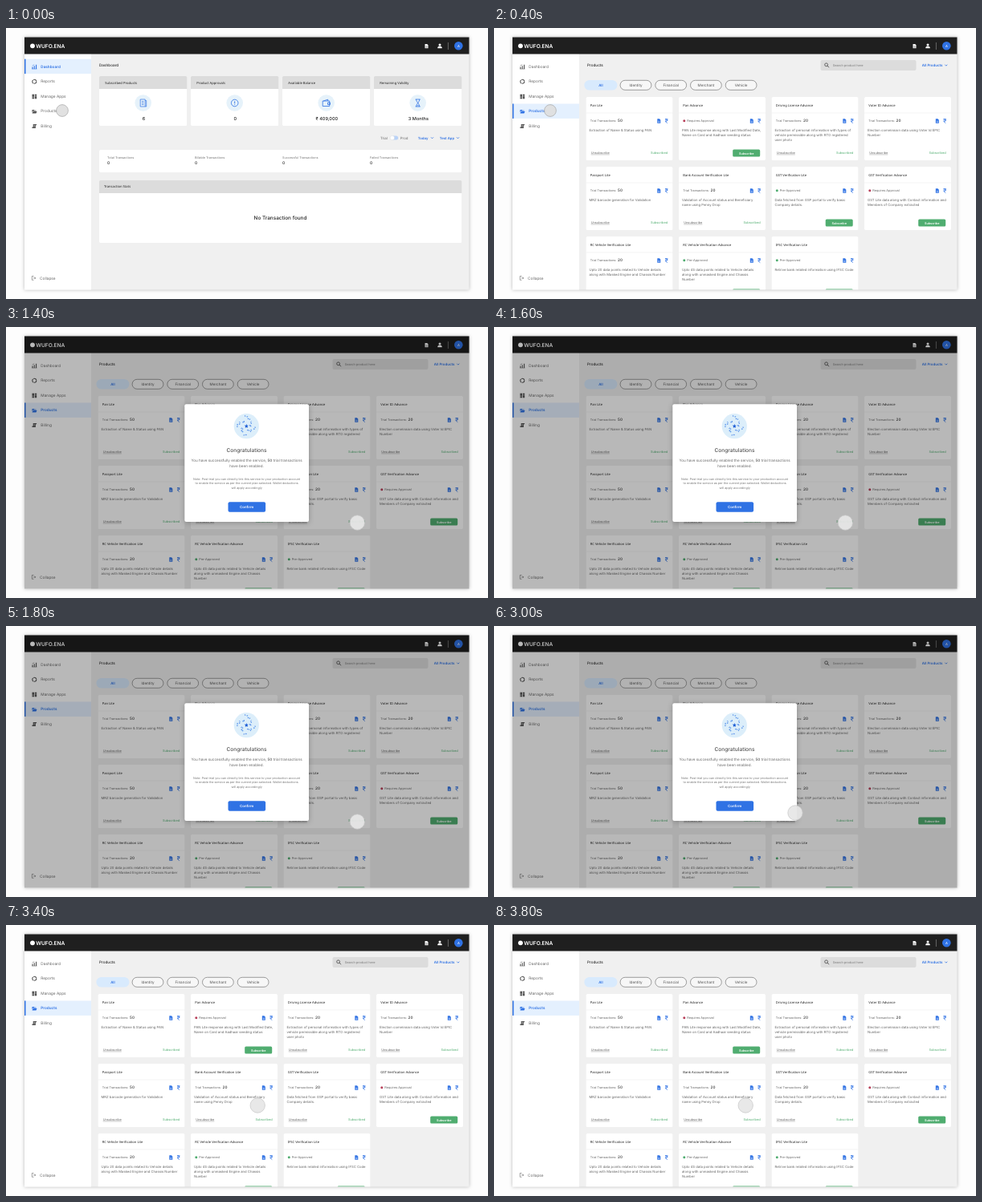
An HTML page that plays this animation: 600x338 px, repeating every 4 s.

```html
<!DOCTYPE html>
<html lang="en">
<head>
<meta charset="utf-8">
<title>Product subscription</title>
<style>
html, body { margin: 0; width: 100%; height: 100%; overflow: hidden; background: #fdfdfd; }
svg { display: block; width: 100vw; height: 100vh; }
text { font-family: Inter, Roboto, sans-serif; text-rendering: geometricPrecision; white-space: pre; }
.noto { font-family: "Noto Sans", "Open Sans", sans-serif; }
.window { filter: drop-shadow(0 0.5px 2px rgba(0, 0, 0, .28)); }
.card { filter: drop-shadow(0 0.3px 0.6px rgba(0, 0, 0, .07)); }
.dialog { filter: drop-shadow(0 1px 3px rgba(0, 0, 0, .25)); }
</style>
</head>
<body>
<svg id="stage" viewBox="0 0 600 338" xmlns="http://www.w3.org/2000/svg"></svg>
<script>
const BLUE = '#2f72e4', GREEN = '#50ad70', RED = '#b8405a', INK = '#2b2b2b', GREY = '#666';

const rect = (x, y, w, h, fill, more = '') =>
  `<rect x="${x}" y="${y}" width="${w}" height="${h}" fill="${fill}" ${more}/>`;
const circle = (x, y, r, fill, more = '') =>
  `<circle cx="${x}" cy="${y}" r="${r}" fill="${fill}" ${more}/>`;
const line = (d, color, width = 0.8, more = '') =>
  `<path d="${d}" fill="none" stroke="${color}" stroke-width="${width}" ${more}/>`;
const shape = (d, fill) => `<path d="${d}" fill="${fill}"/>`;
const text = (x, y, str, size, fill = INK, weight = 400, more = '') =>
  `<text x="${x}" y="${y}" font-size="${size}" fill="${fill}" font-weight="${weight}" ${more}>${str.replace(/&/g, '&amp;')}</text>`;
const mid = (x, y, str, size, fill, weight) => text(x, y, str, size, fill, weight, 'text-anchor="middle"');
const noto = (x, y, str, size) => text(x, y, str, size, '#222', 500, 'class="noto"');
const at = (x, y, body) => `<g transform="translate(${x} ${y})">${body}</g>`;
const group = (id, body) => `<g id="${id}">${body}</g>`;
const chevron = (x, y) => line(`M${x - 1.5} ${y - 0.7}l1.5 1.5 1.5-1.5`, BLUE, 0.8);

const docIcon = (x, y, fill, hole) => at(x, y,
  shape('M-2-2.7H.7L2-1.3V2.7H-2z', fill) + line('M-1 .2H1M-1 1.5H1', hole, 0.5));

const rupee = (x, y) => at(x, y,
  line('M-1.7-2.3H1.8M-1.7-.9H1.8M-1.5-2.3H-.4C1.5-2.3 1.5.5-.4.5H-1.5L1.1 2.7', BLUE, 0.75));

const menuIcons = [
  c => line('M-2.3 2.7V.3M0 2.7V-1M2.3 2.7V-2.4', c, 1.1) + line('M-3.2 2.9H3.2M-2.6-1.2L0-2.5', c, 0.5),
  c => circle(0, 0, 2.5, 'none', `stroke="${c}" stroke-width="1.1" stroke-dasharray="4.6 .6"`),
  c => [[-2.8, -2.7, 3.2], [0.4, -2.7, 2], [-2.8, 0.9, 2], [0.4, -0.3, 3.2]]
    .map(([x, y, h]) => rect(x, y, 2.5, h, c)).join(''),
  c => shape('M-2.8-2H-.5L.2-1.2H2.3V-.4H-1.8L-2.8 1.4z', c) + shape('M-1.5 0H3.2L2.2 2.4H-2.8z', c),
  c => shape('M-1.6-2.5H2.8V-1.3H1.6V2.5H-2.8V1H-1.6z', c) + line('M-.6-1H.8M-.6.3H.8', '#fff', 0.5),
];

function sidebar(active) {
  const items = ['Dashboard', 'Reports', 'Manage Apps', 'Products', 'Billing'];
  return items.map((name, i) => {
    const y = 48 + i * 18.6, on = i === active;
    const color = on ? BLUE : GREY;
    return (on ? rect(23, y - 9.3, 83, 18.4, '#e4f0fe') + rect(23, y - 9.3, 1.5, 18.4, BLUE) : '') +
      at(35.3, y + 0.2, menuIcons[i](on ? BLUE : '#555')) +
      text(43.3, y + 1.6, name, on ? 4.65 : 4.8, color, on ? 600 : 400);
  }).join('');
}

const frame =
  rect(23, 11.5, 553.5, 315, '#f0f0f0', 'class="window"') +
  rect(23, 32, 83, 294.5, '#fff') +
  rect(23, 11.5, 553.5, 21, '#1f1f1f') +
  circle(33, 22.3, 2.9, '#fff') +
  text(37.2, 24.7, 'WUFO.ENA', 6.6, '#fff', 600) +
  docIcon(523.5, 22.6, '#fff', '#1f1f1f') +
  circle(540, 20.9, 1.5, '#fff') + shape('M537.4 25.3V24.2Q537.4 22.8 540 22.8T542.6 24.2V25.3z', '#fff') +
  line('M550.4 18V27', '#999', 0.6) +
  circle(563.3, 22.3, 5.3, BLUE) + mid(563.3, 23.8, 'A', 4, '#fff', 500) +
  line('M34.5 309.5H32.4V314.3H34.5M34 311.9H36.8M35.6 310.7L36.8 311.9L35.6 313.1', '#666', 0.6) +
  text(42, 313.8, 'Collapse', 4.8, GREY);

const tileIcons = [
  line('M-3.5-4.5H2.5V4.5H-3.5zM2.5-3H4V4.5H2.5M-1.8-2H.8M-1.8 0H.8M-1.8 2H.8', BLUE, 0.7),
  circle(0, 0, 4.3, 'none', `stroke="${BLUE}" stroke-width=".8"`) + line('M0-2.2V.6M0 1.4V2.3', BLUE, 0.9),
  line('M-4.5-2.5H4V4H-4.5zM-3.5-2.5L2-4.3V-2.5M4.8-.5H1.8V2H4.8z', BLUE, 0.8),
  line('M-3-4.5H3M-3 4.5H3M-2.2-4.5C-2.2-1.5 2.2 1.5 2.2 4.5M2.2-4.5C2.2-1.5-2.2 1.5-2.2 4.5M-1 3.3H1', BLUE, 0.8),
];

function dashboard() {
  const tiles = [['Subscribed Products', '6'], ['Product Approvals', '0'],
    ['Available Balance', '₹ 409,000'], ['Remaining Validity', '3 Months']];
  const stats = ['Total', 'Billable', 'Successful', 'Failed'];
  return sidebar(0) + text(116, 47.7, 'Dashboard', 4.65, INK, 500) +
    tiles.map(([name, value], i) => {
      const x = 116 + i * 114;
      return rect(x, 60, 109.3, 62, '#fff', 'rx="1.5" class="card"') +
        shape(`M${x} 76V61.5q0-1.5 1.5-1.5h106.3q1.5 0 1.5 1.5V76z`, '#dcdcdc') +
        noto(x + 7.3, 69.6, name, 4.15) +
        circle(x + 54.7, 93.5, 10.3, '#e6f2fa') + at(x + 54.7, 93.5, tileIcons[i]) +
        mid(x + 55.4, 114.7, value, 5.6, '#222', 500);
    }).join('') +
    text(466, 138.5, 'Trial', 4.4, GREY) +
    rect(478.5, 134.5, 9.6, 5, '#b9d2f7', 'rx="2.5"') + circle(480.8, 137, 2.7, '#fff', 'stroke="#ccc" stroke-width=".3"') +
    text(490.8, 138.5, 'Prod', 4.4, GREY) +
    text(512.8, 138.5, 'Today', 4.25, BLUE, 600) + chevron(530.5, 137) +
    text(539.8, 138.5, 'Test App', 4.25, BLUE, 600) + chevron(562.5, 137) +
    rect(116, 152, 451.3, 28, '#fff', 'rx="1.5" class="card"') +
    stats.map((name, i) => {
      const x = 126 + i * 109;
      return text(x, 163.3, name + ' Transactions', 3.85, '#777') + text(x, 170.3, '0', 5, '#222', 500);
    }).join('') +
    rect(116, 190, 451.3, 78, '#fff', 'rx="1.5" class="card"') +
    shape('M116 206V191.5q0-1.5 1.5-1.5h448.3q1.5 0 1.5 1.5V206z', '#dcdcdc') +
    noto(122, 199.4, 'Transaction Stats', 4.15) +
    mid(341.5, 239.3, 'No Transaction found', 6.4, '#222', 500);
}

// state: a number of trial transactions, 'ok' = pre-approved, 'ask' = requires approval
const products = [
  ['Pan Lite', 50, 'Extraction of Name & Status using PAN'],
  ['Pan Advance', 'ask', 'PAN Lite response along with Last Modified Date,|Name on Card and Aadhaar seeding status'],
  ['Driving License Advance', 20, 'Extraction of personal information with types of|vehicle permissible along with RTO registered|user photo'],
  ['Voter ID Advance', 20, 'Election commission data using Voter Id EPIC|Number'],
  ['Passport Lite', 50, 'MRZ barcode generation for Validation'],
  ['Bank Account Verification Lite', 20, 'Validation of Account status and Beneficiary|name using Penny Drop'],
  ['GST Verification Lite', 'ok', 'Data fetched from GSP portal to verify basic|Company details.'],
  ['GST Verification Advance', 'ask', 'GST Lite data along with Contact information and|Members of Company extracted'],
  ['RC Vehicle Verification Lite', 20, 'Upto 20 data points related to Vehicle details|along with Masked Engine and Chassis Number'],
  ['RC Vehicle Verification Advance', 'ok', 'Upto 45 data points related to Vehicle details|along with unmasked Engine and Chassis|Number'],
  ['IFSC Verification Lite', 'ok', 'Retrive bank related information using IFSC Code'],
];

function cardState(state) {
  if (typeof state === 'number') {
    return text(5.3, 31.2, 'Trial Transactions:', 3.78, GREY) + text(39.6, 31.3, String(state), 4.7, '#333', 500) +
      text(6.2, 71, 'Unsubscribe', 3.86, GREY) + line('M6.2 71.9H29.3', GREY, 0.35) +
      text(101.6, 71, 'Subscribed', 3.95, GREEN, 400, 'text-anchor="end"');
  }
  const ask = state === 'ask';
  return circle(6.8, 29.8, 1.5, ask ? RED : GREEN) +
    text(10.2, 31.2, ask ? 'Requires Approval' : 'Pre-Approved', 3.9, GREY) +
    rect(67.2, 65.6, 34, 9, GREEN, 'rx="1.5"') + mid(84.2, 71.5, 'Subscribe', 3.75, '#fff', 600);
}

function card([name, state, desc], i) {
  return at(114.5 + (i % 4) * 115.5, 86 + Math.floor(i / 4) * 87,
    rect(0, 0, 108, 79, '#fff', 'rx="1.5" class="card"') +
    noto(5.3, 11.8, name, 4.1) + line('M0 20H108', '#ededed', 0.6) +
    group('state' + i, cardState(state)) +
    docIcon(90.8, 30, BLUE, '#fff') + rupee(100.2, 30) +
    desc.split('|').map((row, n) => text(4, 43.2 + n * 5.8, row, 4.23, GREY)).join(''));
}

function catalogue() {
  const pills = ['All', 'Identity', 'Financial', 'Merchant', 'Vehicle'];
  return sidebar(3) + text(116, 47.7, 'Products', 4.65, INK, 500) +
    rect(406.5, 40, 119, 13, '#dcdcdc', 'rx="2"') +
    circle(413.6, 45.8, 1.9, 'none', 'stroke="#333" stroke-width=".7"') + line('M415 47.2L417 49.2', '#333', 0.8) +
    text(421.8, 47.6, 'Search product here', 3.9, '#777') +
    text(532.8, 47.8, 'All Products', 4.4, BLUE, 600) + chevron(562.8, 46.4) +
    pills.map((name, i) => {
      const x = 113.4 + i * 43.7;
      return i ? rect(x, 65.3, 38.8, 12, '#f7f7f7', 'rx="6" stroke="#777" stroke-width=".7"') +
          mid(x + 19.4, 72.9, name, 4.6, '#555')
        : rect(x - 1, 65, 41, 12.6, '#d8eafd', 'rx="6.3"') + mid(x + 19.5, 72.9, name, 4.4, BLUE, 600);
    }).join('') +
    `<g clip-path="url(#pane)">${products.map(card).join('')}</g>`;
}

function confetti() {
  let out = '';
  for (let i = 0; i < 26; i++) {
    const a = i * 2.4, r = 4.5 + (i * 3.7) % 8;
    const x = Math.cos(a) * r, y = Math.sin(a) * r;
    out += i % 3
      ? circle(x, y, i % 2 ? 0.7 : 0.9, i % 2 ? BLUE : '#6fa5ee')
      : line(`M${x} ${y}l${Math.cos(a) * 1.6} ${Math.sin(a) * 1.6}`, BLUE, 0.8);
  }
  const star = Array.from({ length: 10 }, (_, i) => {
    const a = i * Math.PI / 5 - Math.PI / 2, r = i % 2 ? 1.2 : 2.8;
    return `${Math.cos(a) * r} ${Math.sin(a) * r}`;
  });
  return out + shape('M' + star.join('L') + 'z', '#1f5fd6');
}

function dialog() {
  return rect(23, 11.5, 553.5, 315, '#000', 'opacity=".28"') +
    rect(222.3, 96.3, 154.7, 146.7, '#fff', 'rx="2" class="dialog"') +
    circle(299.3, 123.7, 15.6, '#dceefa') + at(299.3, 123.7, confetti()) +
    mid(299.5, 156.3, 'Congratulations', 6.6, '#555', 500) +
    mid(299.6, 168.4, 'You have successfully enabled the service, <tspan font-weight="600">50</tspan> trial transactions', 4.6, GREY) +
    mid(299.6, 175, 'have been enabled.', 4.6, GREY) +
    ['Note: Post trial you can directly link this service to your production account',
      'to enable the service as per the current plan selected. Wallet deductions',
      'will apply accordingly'].map((row, i) => mid(299.6, 190.6 + i * 5.6, row, 3.75, '#777')).join('') +
    rect(276.5, 218.2, 46.6, 12.6, BLUE, 'rx="2"') + mid(299.6, 226, 'Confirm', 4.35, '#fff', 600);
}

const stage = document.getElementById('stage');
stage.innerHTML =
  '<defs><clipPath id="pane"><rect x="106" y="80" width="470.5" height="246.2"/></clipPath></defs>' +
  rect(0, 0, 600, 338, '#fdfdfd') + frame +
  group('dashboard', dashboard()) + group('catalogue', catalogue()) + group('dialog', dialog()) +
  '<circle id="cursor" stroke-width=".7"/>';

const $ = id => document.getElementById(id);
const target = $('state6');
const gstBefore = target.innerHTML, gstAfter = cardState(20);

// start ms, view, cursor x, y, radius, pressed
const steps = [
  [0, 'dashboard', 70, 103, 7.4, 1],
  [200, 'catalogue', 70, 103, 7.4, 1],
  [1000, 'catalogue', 250, 172, 8.5, 0],
  [1200, 'catalogue', 429.5, 241, 7.4, 1],
  [1400, 'dialog', 437.3, 244, 9.2, 0],
  [3000, 'dialog', 375, 233, 9.2, 0],
  [3200, 'dialog', 313.2, 225.3, 7.4, 1],
  [3400, 'catalogue', 313.2, 225, 9.2, 0],
];
let current = null;

function draw(now) {
  const t = now % 4000;
  const step = steps.filter(s => s[0] <= t).pop();
  if (step !== current) {
    current = step;
    const [start, view, x, y, r, pressed] = step;
    const show = (id, on) => $(id).setAttribute('display', on ? 'inline' : 'none');
    show('dashboard', view === 'dashboard');
    show('catalogue', view !== 'dashboard');
    show('dialog', view === 'dialog');
    target.innerHTML = start >= 1400 ? gstAfter : gstBefore;
    const look = { cx: x, cy: y, r, fill: pressed ? '#dedede' : '#e6e6e6',
      'fill-opacity': pressed ? 0.9 : 0.93, stroke: pressed ? '#a8a8a8' : '#c6c6c6' };
    for (const key in look) $('cursor').setAttribute(key, look[key]);
  }
  requestAnimationFrame(draw);
}
draw(performance.now());
</script>
</body>
</html>
```
